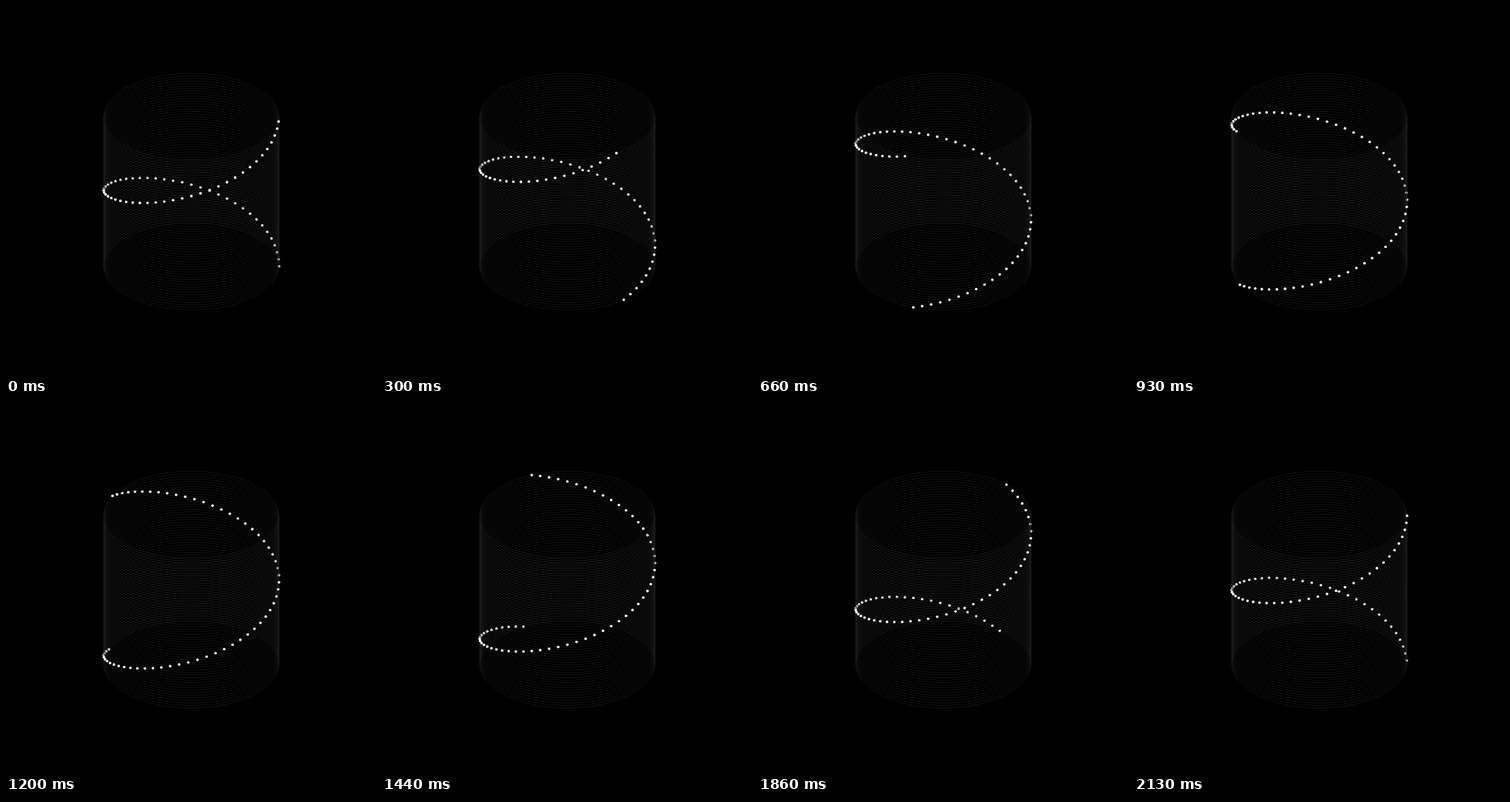
An HTML page with a canvas that plays this animation: 500 px wide and 500 px high, repeating every 2.16 s.

```html
<!DOCTYPE html>
<html>
<head>
<meta charset="utf-8">
<style>
html, body { margin: 0; width: 100%; height: 100%; overflow: hidden; background: #000; }
canvas { display: block; }
</style>
</head>
<body>
<canvas id="stage" width="500" height="500"></canvas>
<script>
const ctx = document.getElementById('stage').getContext('2d');
const TAU = Math.PI * 2;
const LOOP = 2160, TICK = 30;
const COUNT = 60, STEP = TAU / COUNT;
const CX = 250.5, RX = 118.5, RY = 59, TOP = 150, BOTTOM = 351.8;
const ringY = k => TOP + (BOTTOM - TOP) * k / (COUNT - 1);

function halfRings(from) {
  ctx.strokeStyle = '#222';
  ctx.lineWidth = 0.55;
  for (let k = 0; k < COUNT; k++) {
    ctx.beginPath();
    ctx.ellipse(CX, ringY(k), RX, RY, 0, from, from + Math.PI);
    ctx.stroke();
  }
}

function dots(turn, front) {
  ctx.fillStyle = '#fff';
  for (let k = 0; k < COUNT; k++) {
    const a = turn + (k + 1) * STEP;
    if ((Math.sin(a) >= 0) !== front) continue;
    ctx.beginPath();
    ctx.arc(CX + RX * Math.cos(a), ringY(k) + RY * Math.sin(a), 1.8, 0, TAU);
    ctx.fill();
  }
}

function draw(ms) {
  const turn = Math.floor(ms % LOOP / TICK) * TICK / LOOP * TAU;
  ctx.fillStyle = '#000';
  ctx.fillRect(0, 0, 500, 500);
  // Far half first, so the near rings cross the far dots
  halfRings(Math.PI);
  dots(turn, false);
  halfRings(0);
  dots(turn, true);
}

const start = performance.now();
function frame() {
  draw(performance.now() - start);
  requestAnimationFrame(frame);
}
frame();
</script>
</body>
</html>
```
